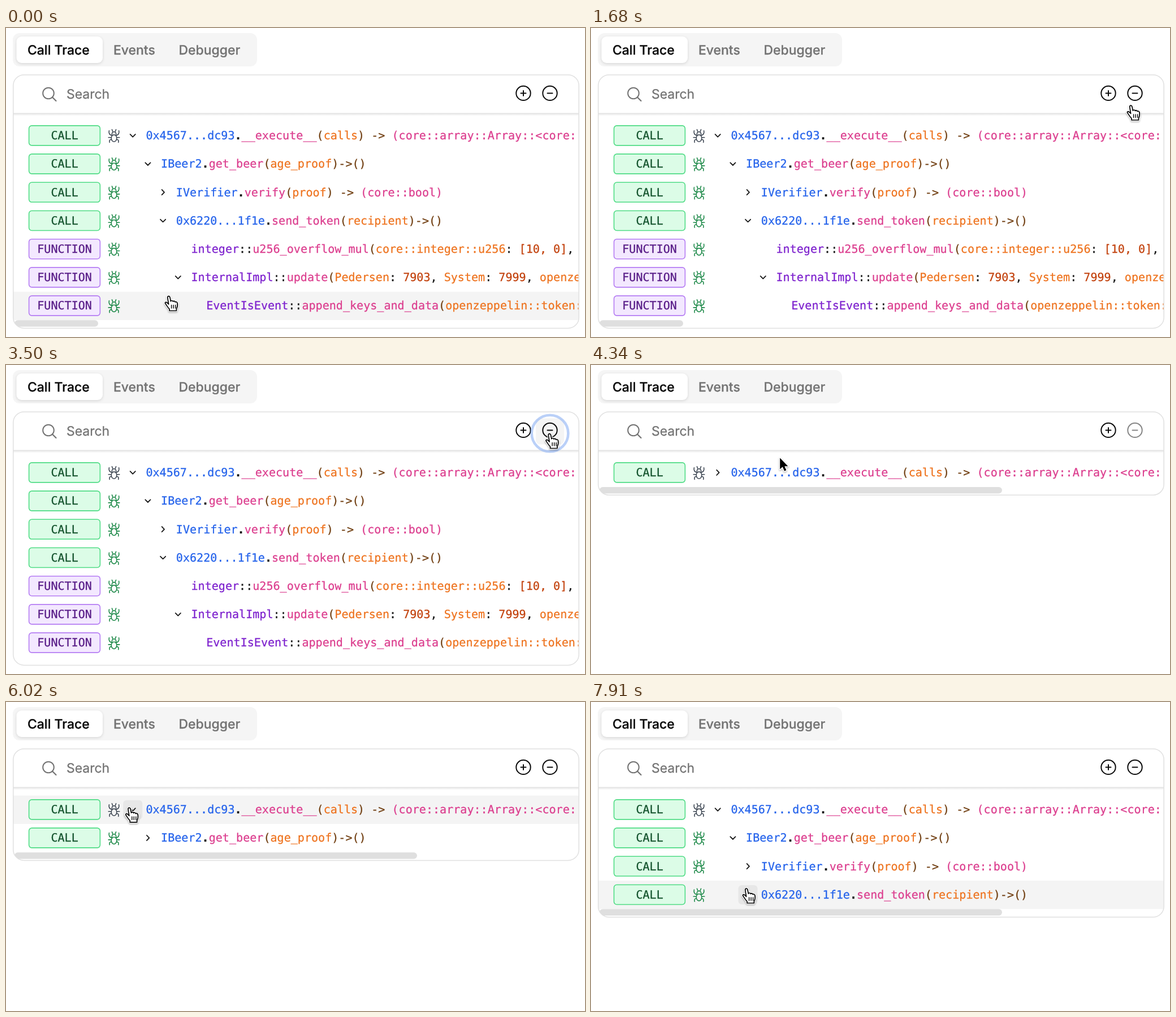
Animation, 1024 px wide and 547 px high, one loop 8000 ms. Source, as an HTML page with a canvas:

```html
<!DOCTYPE html>
<html lang="en">
<head>
<meta charset="utf-8">
<title>Call Trace</title>
<style>
html, body { margin: 0; width: 100%; height: 100%; overflow: hidden; background: #fff; }
canvas { display: block; width: 1024px; height: 547px; }
</style>
</head>
<body>
<canvas id="stage"></canvas>
<script>
const W = 1024, H = 547, LOOP = 8000, STEP = 70;
const canvas = document.getElementById('stage');
const ctx = canvas.getContext('2d');
const dpr = window.devicePixelRatio || 1;
canvas.width = W * dpr;
canvas.height = H * dpr;

// Text is set at its interface size and enlarged with the whole view.
const ZOOM = 1.434;
const SANS = '16px Inter, "Liberation Sans", sans-serif';
const MONO = '14px "DejaVu Sans Mono", "Liberation Mono", monospace';
const CHAR = 14 * .602 * ZOOM;
const ROW_TOP = 165.6, ROW_H = 50.2, INDENT = 26.7;

const INK = {
  b: '#2563eb', k: '#171717', p: '#dc3f8f', o: '#ee7420',
  n: '#713f12', r: '#c2410c', v: '#7e22ce'
};
const BADGE = {
  CALL: ['#dcfce7', '#4fdc85', '#14532d'],
  FUNCTION: ['#f3e8ff', '#b57cf3', '#581c87']
};

// openAt: number of visible rows from which the row is expanded; 0 = no children
const ROWS = [
  { kind: 'CALL', level: 0, openAt: 2, code: ['b', '0x4567...dc93', 'k', '.', 'p', '__execute__', 'n', '(', 'o', 'calls', 'n', ') -> ', 'p', '(core::array::Array::<core::'] },
  { kind: 'CALL', level: 1, openAt: 3, code: ['b', 'IBeer2', 'k', '.', 'p', 'get_beer', 'n', '(', 'o', 'age_proof', 'n', ')->()'] },
  { kind: 'CALL', level: 2, openAt: 99, code: ['b', 'IVerifier', 'k', '.', 'p', 'verify', 'n', '(', 'o', 'proof', 'n', ') -> ', 'p', '(core::bool)'] },
  { kind: 'CALL', level: 2, openAt: 5, code: ['b', '0x6220...1f1e', 'k', '.', 'p', 'send_token', 'n', '(', 'o', 'recipient', 'n', ')->()'] },
  { kind: 'FUNCTION', level: 3, openAt: 0, code: ['v', 'integer', 'k', '::', 'p', 'u256_overflow_mul', 'n', '(', 'o', 'core::integer::u256', 'k', ': ', 'r', '[10, 0]', 'k', ', '] },
  { kind: 'FUNCTION', level: 3, openAt: 7, code: ['v', 'InternalImpl', 'k', '::', 'p', 'update', 'n', '(', 'o', 'Pedersen', 'k', ': ', 'r', '7903', 'k', ', ', 'o', 'System', 'k', ': ', 'r', '7999', 'k', ', ', 'o', 'openzeppelin'] },
  { kind: 'FUNCTION', level: 4, openAt: 0, code: ['v', 'EventIsEvent', 'k', '::', 'p', 'append_keys_and_data', 'n', '(', 'o', 'openzeppelin::token::'] }
];

// start, end, target x, target y, bend
const START = [288.5, 474];
const MOVES = [
  [960, 1680, 955.5, 136.5, 0],
  [3050, 3220, 962, 121, 0],
  [3700, 4671, 216, 181, -13],
  [5850, 6430, 243, 235, 0],
  [6970, 7490, 272, 334, 0],
  [7600, 7910, 275.5, 329.5, 0]
];
const CLICKS = [3420, 5130, 6550];
const HOLD = 150;
const COUNTS = [7, 1, 2, 4];

const HAND = new Path2D('M9 27.5V24.4C6 22 4 17.6 1.8 14.8C.6 12.6 3 11.4 4.8 13.2L7.6 16L5.8 4.6C5.4 1 9.2 .6 9.9 3.8L11.4 10.8C12.2 8.8 15 9.2 15.3 11.2C16.4 9.6 18.8 10.2 19.1 12.2C20.6 11 22.8 12 23.1 14.2C23.7 18 23.2 21 21.4 24.4V27.5Z');
const KNUCKLES = new Path2D('M12.6 17.5V23M16.1 17.5V23M19.6 17.5V23');
const ARROW = new Path2D('M0 0V20L4.6 15.8L7.8 23.2L11.2 21.8L8.1 14.6H14.2Z');
const BUG = new Path2D('M-4.8 4.5A4.8 5.6 0 0 1 4.8 4.5A4.8 6.6 0 0 1 -4.8 4.5ZM-3.6 -1.5A3.7 4 0 1 1 3.6 -1.5M-2.2 -7L-3.6 -10.5M2.2 -7L3.6 -10.5M-4 0Q-10 -1.5 -8.6 -8.5M4 0Q10 -1.5 8.6 -8.5M-4.8 3.5H-9.8M4.8 3.5H9.8M-4.4 7Q-9 7 -7.8 12.3M4.4 7Q9 7 7.8 12.3');

const clamp = v => Math.max(0, Math.min(1, v));
const ease = u => u < .5 ? 4 * u ** 3 : 1 - 4 * (1 - u) ** 3;

function box(x, y, w, h, r, fill, stroke, lw = 1.5) {
  ctx.beginPath();
  ctx.roundRect(x, y, w, h, r);
  if (fill) { ctx.fillStyle = fill; ctx.fill(); }
  if (stroke) { ctx.strokeStyle = stroke; ctx.lineWidth = lw; ctx.stroke(); }
}

function line(points, color, lw) {
  ctx.beginPath();
  points.forEach(([x, y]) => ctx.lineTo(x, y));
  ctx.strokeStyle = color;
  ctx.lineWidth = lw;
  ctx.stroke();
}

function ring(x, y, r, color, lw) {
  ctx.beginPath();
  ctx.arc(x, y, r, 0, Math.PI * 2);
  ctx.strokeStyle = color;
  ctx.lineWidth = lw;
  ctx.stroke();
}

// A hairline stroke gives the slightly heavier look of smoothed type.
function text(str, x, y, font, color) {
  ctx.save();
  ctx.translate(x, y);
  ctx.scale(ZOOM, ZOOM);
  ctx.font = font;
  ctx.textRendering = 'geometricPrecision';
  ctx.fillStyle = ctx.strokeStyle = color;
  ctx.lineWidth = .2;
  ctx.fillText(str, 0, 0);
  ctx.strokeText(str, 0, 0);
  ctx.restore();
}

function pointerAt(t) {
  let [x, y] = START;
  for (const [from, to, tx, ty, bend] of MOVES) {
    if (t <= from) break;
    const p = ease(clamp((t - from) / (to - from)));
    x += (tx - x) * p;
    y += (ty - y) * p + bend * 4 * p * (1 - p);
  }
  return { x, y };
}

function drawTabs() {
  box(12, 9, 432, 59, 12, '#f5f5f5');
  ctx.save();
  ctx.shadowColor = 'rgba(0,0,0,.13)';
  ctx.shadowBlur = 5 * dpr;
  ctx.shadowOffsetY = 1.5 * dpr;
  box(18.5, 15, 152.5, 47, 9, '#fff');
  ctx.restore();
  const font = '500 ' + SANS;
  text('Call Trace', 38, 46.5, font, '#0a0a0a');
  text('Events', 190, 46.5, font, '#737373');
  text('Debugger', 305.5, 46.5, font, '#737373');
}

function drawHeader(t, count, overMinus) {
  ring(75, 115.5, 9.8, '#737373', 2);
  line([[82, 122.5], [88.5, 129]], '#737373', 2.2);
  text('Search', 107, 125.3, SANS, '#737373');

  if (overMinus) {
    ctx.globalAlpha = clamp((t - 1680) / 100);
    box(937, 94.5, 50, 46, 8, '#f4f4f4');
    ctx.globalAlpha = 1;
  }
  const mid = 115.4;
  ring(915, mid, 12.7, '#0a0a0a', 2);
  line([[910.5, mid], [919.5, mid]], '#0a0a0a', 2);
  line([[915, mid - 4.5], [915, mid + 4.5]], '#0a0a0a', 2);
  const minus = count === 1 ? '#858585' : '#0a0a0a';
  ring(962, mid, 12.7, minus, 2);
  line([[957.5, mid], [966.5, mid]], minus, 2);

  ctx.fillStyle = '#e3e3e3';
  ctx.fillRect(13, 150.5, 1000, 1.7);
  const shade = ctx.createLinearGradient(0, 152, 0, 156);
  shade.addColorStop(0, 'rgba(0,0,0,.07)');
  shade.addColorStop(1, 'rgba(0,0,0,0)');
  ctx.fillStyle = shade;
  ctx.fillRect(13, 152, 1000, 4);
}

function drawRow(row, i, count, pointer, hovered) {
  const mid = ROW_TOP + ROW_H * (i + .5) - .5;
  const chevX = 224.2 + row.level * INDENT;
  if (hovered) {
    ctx.fillStyle = '#f4f4f4';
    ctx.fillRect(13, ROW_TOP + ROW_H * i, 1000, ROW_H);
    if (row.openAt && Math.abs(pointer.x - chevX) < 17) {
      box(chevX - 17, mid - 16.5, 34, 34, 6, '#e7e7e7');
    }
  }

  const [fill, border, ink] = BADGE[row.kind];
  box(40.6, mid - 17.3, 125.8, 35, 5, fill, border, 1.6);
  text(row.kind, 103.6 - row.kind.length * CHAR / 2, mid + 6.9, MONO, ink);

  ctx.save();
  ctx.translate(191, mid);
  ctx.strokeStyle = i ? '#1f8a4a' : '#3f4854';
  ctx.lineWidth = 1.6;
  ctx.stroke(BUG);
  ctx.restore();

  if (row.openAt) {
    const shape = count >= row.openAt
      ? [[-4.6, -2], [0, 2.6], [4.6, -2]]
      : [[-2, -4.4], [2.4, .2], [-2, 4.8]];
    line(shape.map(([x, y]) => [chevX + x, mid + y]), '#171717', 1.8);
  }

  let x = 247.4 + row.level * INDENT;
  for (let k = 0; k < row.code.length; k += 2) {
    const key = row.code[k], part = row.code[k + 1];
    text(part, x, mid + 6.9, (part === '.' ? 'bold ' : '') + MONO, INK[key]);
    x += part.length * CHAR;
  }
}

function drawClick(t) {
  for (const start of CLICKS) {
    const dt = t - start;
    if (dt <= 0 || dt > 420) continue;
    const grow = clamp(dt / 125);
    const { x, y } = pointerAt(start);
    ctx.globalAlpha = grow * (1 - clamp((dt - 200) / 220));
    ring(x, y, 24 + 13 * grow, '#94b6f5', 4.6);
    ctx.globalAlpha = 1;
  }
}

function drawPointer({ x, y }, hand) {
  ctx.save();
  ctx.translate(hand ? x - 8.5 : x, hand ? y - 1 : y);
  const shape = hand ? HAND : ARROW;
  ctx.save();
  ctx.shadowColor = 'rgba(0,0,0,.3)';
  ctx.shadowBlur = 3 * dpr;
  ctx.shadowOffsetY = 1.5 * dpr;
  ctx.strokeStyle = '#fff';
  ctx.lineWidth = hand ? 4 : 3;
  ctx.stroke(shape);
  ctx.restore();
  ctx.fillStyle = hand ? '#fff' : '#000';
  ctx.fill(shape);
  if (hand) {
    ctx.strokeStyle = '#000';
    ctx.lineWidth = 1.7;
    ctx.stroke(shape);
    ctx.lineWidth = 1.4;
    ctx.stroke(KNUCKLES);
  }
  ctx.restore();
}

function draw(t) {
  const done = CLICKS.filter(c => t >= c + HOLD).length;
  const count = COUNTS[done];
  const bottom = 180 + ROW_H * count;
  const pointer = pointerAt(t);
  const over = Math.floor((pointer.y - ROW_TOP) / ROW_H);
  const overRow = over >= 0 && over < count;
  const overMinus = Math.abs(pointer.x - 962) < 25 && pointer.y > 94 && pointer.y < 141;

  ctx.setTransform(dpr, 0, 0, dpr, 0, 0);
  ctx.fillStyle = '#fff';
  ctx.fillRect(0, 0, W, H);
  ctx.lineCap = ctx.lineJoin = 'round';

  drawTabs();

  ctx.save();
  ctx.beginPath();
  ctx.roundRect(12.8, 83, 1000, bottom - 83, 19);
  ctx.clip();
  ROWS.slice(0, count).forEach((row, i) => drawRow(row, i, count, pointer, i === over));
  drawHeader(t, count, overMinus);
  ctx.globalAlpha = done ? 1 : 1 - clamp((t - 1750) / 490);
  box(15, bottom - 14.2, done ? 712 : 148, 11.5, 5.75, '#dfdfdf');
  ctx.restore();

  box(12.8, 83, 1000.4, bottom - 83, 19, null, '#e0e0e0', 1.5);
  drawClick(t);
  drawPointer(pointer, overRow || overMinus);
}

let origin = null;
function tick(now) {
  if (origin === null) origin = now;
  const t = (now - origin) % LOOP;
  draw(Math.min(Math.floor(t / STEP) * STEP, 7910));
  requestAnimationFrame(tick);
}
draw(0);
requestAnimationFrame(tick);
</script>
</body>
</html>
```
